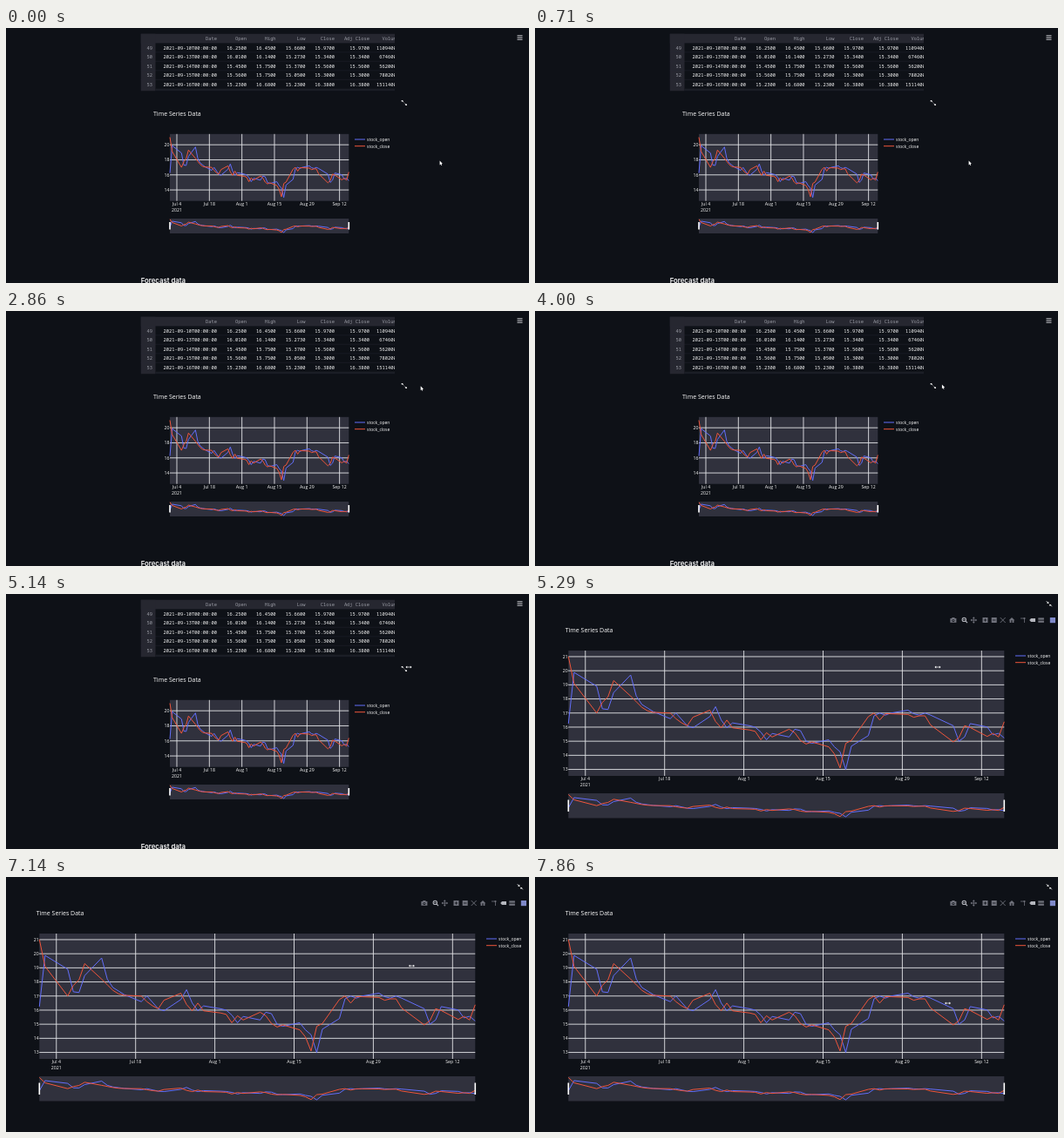
An HTML page with a canvas that plays this animation: 600 by 293 pixels, repeating every 8000 ms.

```html
<!DOCTYPE html>
<html lang="en">
<head>
<meta charset="utf-8">
<title>Time Series Data</title>
<style>
html, body { margin: 0; width: 100%; height: 100%; overflow: hidden; background: #0e1117; }
canvas { display: block; width: 600px; height: 293px; }
</style>
</head>
<body>
<canvas id="stage"></canvas>
<script>
const LOOP = 8000, FPS = 7, FULLSCREEN_AT = 5285;
const PAGE = '#0e1117', PANEL = '#30313d', HEADER = '#262730', WHITE = '#fafafa';
const BLUE = '#636efa', RED = '#ef553b', MUTED = '#70727c';
const SANS = '"Open Sans", sans-serif', MONO = '"Noto Sans Mono", monospace';

const canvas = document.getElementById('stage');
const ctx = canvas.getContext('2d');
const ratio = window.devicePixelRatio || 1;
canvas.width = 600 * ratio;
canvas.height = 293 * ratio;

// Trading days counted from 1 July: no weekends, no 5 July or 6 September.
const days = [];
for (let d = 0; d <= 77; d++) {
  const weekday = (d + 4) % 7;
  if (weekday !== 0 && weekday !== 6 && d !== 4 && d !== 67) days.push(d);
}

const open = [16.25, 19.88, 18.9, 17.3, 17.25, 18.45, 19.7, 18.2, 17.6, 17.35, 17.1,
  16.6, 17, 16.55, 16.1, 15.95, 16.75, 17.45, 16.5, 15.95, 16.3, 16.1, 16, 15.65, 15.1, 15.55,
  15.3, 15.85, 15.75, 15, 14.85, 15.1, 14.6, 14.25, 13, 14.65, 15.4, 16.8, 17, 16.85, 17,
  17.2, 16.95, 16.85, 17, 16.85, 16.1, 15, 15.3, 16.25, 16.01, 15.45, 15.56, 15.23];
const close = [21, 19.1, 17, 17.75, 18.15, 19.3, 18.2, 17.8, 17.4, 17.15, 17.05,
  17, 16.6, 16.3, 16.1, 16.7, 17.2, 16.4, 15.95, 16.5, 15.95, 15.8, 15.7, 15.1, 15.6, 15.3,
  15.85, 15.6, 15.05, 14.8, 14.95, 14.6, 14.1, 13.1, 14.85, 15.05, 16.75, 17, 16.5, 16.95, 16.95,
  16.9, 16.7, 16.8, 16.8, 16.15, 14.95, 15.25, 16.1, 15.97, 15.34, 15.56, 15.3, 16.38];

const TOP_VALUE = 21.43, BOTTOM_VALUE = 12.54;
const dateTicks = ['Jul 4', 'Jul 18', 'Aug 1', 'Aug 15', 'Aug 29', 'Sep 12'];

const tableColumns = [242, 276, 309.6, 343.4, 377, 417, 451];
const tableHead = ['Date', 'Open', 'High', 'Low', 'Close', 'Adj Close', 'Volume'];
const tableRows = [
  ['10', '16.2500', '16.4500', '15.6600', '15.9700', '11094000'],
  ['13', '16.0100', '16.1400', '15.2730', '15.3400', '6746000'],
  ['14', '15.4500', '15.7500', '15.3700', '15.5600', '5620000'],
  ['15', '15.5600', '15.7500', '15.0500', '15.3000', '7802000'],
  ['16', '15.2300', '16.6800', '15.2300', '16.3800', '15114000']
];

const smallView = {
  x: 188, y: 121.8, w: 205.3, h: 76.9, slider: [219, 17], handle: [223, 8.5],
  ticks: [14, 16, 18, 20], title: [169, 98.5], legend: [400, 128], labelY: 202.6
};
const fullView = {
  x: 38.3, y: 65, w: 500, h: 144, slider: [229, 28.5], handle: [236.5, 13.5],
  ticks: [13, 14, 15, 16, 17, 18, 19, 20, 21], title: [34.7, 41.5], legend: [551, 71], labelY: 212.6
};

// Cursor positions: time, x, y
const cursorPath = [
  [0, 497.6, 152.5], [2150, 497.6, 152.5], [2300, 493, 142], [2860, 475.6, 86],
  [3430, 472.5, 85], [4500, 462, 84], [6950, 462, 84], [7600, 473.5, 145], [LOOP, 473.5, 145]
];
const ARROW_UNTIL = 4350;

function rect(x, y, w, h, color) {
  ctx.fillStyle = color;
  ctx.fillRect(x, y, w, h);
}

function line(points, color, width = 1) {
  ctx.beginPath();
  points.forEach(([x, y]) => ctx.lineTo(x, y));
  ctx.strokeStyle = color;
  ctx.lineWidth = width;
  ctx.stroke();
}

function shape(points, color) {
  ctx.beginPath();
  points.forEach(([x, y]) => ctx.lineTo(x, y));
  ctx.fillStyle = color;
  ctx.fill();
}

// Text centred vertically on y by its cap height.
function text(string, x, y, size, { align = 'left', color = WHITE, family = SANS, weight = 400 } = {}) {
  ctx.font = `${weight} ${size}px ${family}`;
  ctx.textAlign = align;
  ctx.fillStyle = color;
  ctx.fillText(string, x, y + size * 0.36);
}

function drawSeries(values, color, x, y, w, h) {
  const scale = h / (TOP_VALUE - BOTTOM_VALUE);
  line(values.map((v, i) => [x + days[i] * w / 77, y + (TOP_VALUE - v) * scale]), color, 1);
}

function drawChart({ x, y, w, h, slider, handle, ticks, title, legend, labelY }) {
  rect(x, y, w, h, PANEL);
  ticks.forEach(value => {
    const tickY = y + (TOP_VALUE - value) * h / (TOP_VALUE - BOTTOM_VALUE);
    line([[x, tickY], [x + w, tickY]], '#e4e5e8', 0.9);
    text(value, x - 0.6, tickY, 5.2, { align: 'right' });
  });
  dateTicks.forEach((label, i) => {
    const tickX = x + (3 + 14 * i) * w / 77;
    line([[tickX, y], [tickX, y + h]], '#e4e5e8', 0.9);
    text(label, tickX, labelY, 5.2, { align: 'center' });
    if (i === 0) text('2021', tickX, labelY + 6.7, 5.2, { align: 'center' });
  });

  const [sliderY, sliderH] = slider;
  rect(x, sliderY, w, sliderH, PANEL);
  [[open, BLUE], [close, RED]].forEach(([values, color]) => {
    drawSeries(values, color, x, y, w, h);
    drawSeries(values, color, x, sliderY, w, sliderH);
  });
  [x, x + w].forEach(edge => rect(edge - 0.8, handle[0], 1.6, handle[1], '#fff'));

  text('Time Series Data', ...title, 7);
  [['stock_open', BLUE], ['stock_close', RED]].forEach(([name, color], i) => {
    const rowY = legend[1] + i * 7.7;
    line([[legend[0], rowY], [legend[0] + 12, rowY]], color, 1);
    text(name, legend[0] + 14, rowY, 5);
  });
}

function drawTable() {
  const mono = { align: 'right', family: MONO };
  const muted = { ...mono, color: '#9b9da6' };
  ctx.save();
  ctx.beginPath();
  ctx.rect(154.5, 6.5, 291.5, 66);
  ctx.clip();
  rect(154.5, 6.5, 291.5, 10.5, HEADER);
  rect(154.5, 6.5, 17, 66, HEADER);
  rect(171.5, 69.7, 274.5, 2.5, '#1b1e26');
  tableHead.forEach((name, i) => text(name, tableColumns[i], 12.3, 5.4, muted));
  tableRows.forEach(([day, o, high, low, c, volume], row) => {
    const y = 22.6 + row * 10.5;
    line([[154.5, y - 5.3], [446, y - 5.3]], '#272a33', 0.4);
    text(49 + row, 168, y, 5.4, muted);
    [`2021-09-${day}T00:00:00`, o, high, low, c, c, volume]
      .forEach((value, i) => text(value, tableColumns[i], y, 5.4, mono));
  });
  ctx.restore();
}

// Two diagonal arrows pointing out of (1) or into (-1) the centre.
function drawResizeIcon(x, y, direction, flip) {
  [-1, 1].forEach(side => {
    const at = (a, b) => [x + side * a * flip, y + side * b];
    const [tip, tail] = direction > 0 ? [3, 0.7] : [0.6, 3];
    const base = tip + (direction > 0 ? -2.1 : 2.1);
    line([at(tip, tip), at(tail, tail)], WHITE, 0.9);
    shape([at(tip, tip), at(base, tip), at(tip, base)], WHITE);
  });
}

function drawModebar() {
  const y = 30, active = '#b4b6bd';
  const plus = (x, r, color, width = 1) => {
    line([[x - r, y], [x + r, y]], color, width);
    line([[x, y - r], [x, y + r]], color, width);
  };
  const dot = (x, cy, r, color) => {
    ctx.beginPath();
    ctx.arc(x, cy, r, 0, 7);
    ctx.fillStyle = color;
    ctx.fill();
  };
  // camera
  rect(476.4, 28, 7, 4.8, MUTED);
  rect(478.3, 27, 3.2, 1.2, MUTED);
  dot(479.9, 30.4, 1.5, PAGE);
  dot(479.9, 30.4, 0.8, MUTED);
  // zoom
  dot(492.3, 29.4, 2.7, active);
  dot(492.3, 29.4, 1.6, PAGE);
  line([[491, 29.4], [493.6, 29.4]], active, 0.7);
  line([[494, 31.2], [496, 33.2]], active, 1.2);
  // pan
  plus(503.3, 3.3, MUTED, 0.9);
  [[0, -1], [1, 0], [0, 1], [-1, 0]].forEach(([dx, dy]) => shape([
    [503.3 + dx * 3.7, y + dy * 3.7],
    [503.3 + dx * 2 + dy * 1.4, y + dy * 2 + dx * 1.4],
    [503.3 + dx * 2 - dy * 1.4, y + dy * 2 - dx * 1.4]
  ], MUTED));
  // zoom in and out
  [516.5, 526.7].forEach(x => rect(x - 3, 27, 6, 6, MUTED));
  plus(516.5, 1.7, PAGE, 0.8);
  line([[525, y], [528.4, y]], PAGE, 0.8);
  // autoscale
  line([[533.7, 27], [539.7, 33]], MUTED, 0.9);
  line([[539.7, 27], [533.7, 33]], MUTED, 0.9);
  // home
  shape([[543.6, 30.3], [547, 27], [550.4, 30.3]], MUTED);
  rect(544.6, 30, 1.8, 3, MUTED);
  rect(547.6, 30, 1.8, 3, MUTED);
  // spike lines
  line([[557, 28], [561.5, 28], [561.5, 33]], MUTED, 0.8);
  rect(560.6, 27.1, 1.8, 1.8, MUTED);
  // hover modes
  shape([[567.2, 30], [569, 28], [574, 28], [574, 32], [569, 32]], active);
  rect(577.3, 27.4, 6.6, 2.2, MUTED);
  rect(577.3, 30.6, 6.6, 2.2, MUTED);
  rect(590.8, 27, 6.2, 6.2, '#7f89c9');
}

function drawCursor(time) {
  const next = Math.max(1, cursorPath.findIndex(([t]) => t > time));
  const [t0, x0, y0] = cursorPath[next - 1], [t1, x1, y1] = cursorPath[next];
  const p = (time - t0) / (t1 - t0);
  const x = x0 + (x1 - x0) * p, y = y0 + (y1 - y0) * p;
  if (time < ARROW_UNTIL) {
    shape([[0, 0], [0, 4.9], [1.1, 3.9], [1.8, 5.5], [2.6, 5.1], [1.9, 3.6], [3.3, 3.5]]
      .map(([dx, dy]) => [x + dx, y + dy]), '#fff');
    return;
  }
  line([[x - 2.5, y], [x + 2.5, y]], '#fff', 0.7);
  [-1, 1].forEach(s => shape([[x + s * 3.5, y], [x + s * 1.8, y - 1.4], [x + s * 1.8, y + 1.4]], '#fff'));
}

function drawPage() {
  drawTable();
  drawChart(smallView);
  drawResizeIcon(456.8, 86, 1, 1);
  [8.8, 11, 13.2].forEach(y => line([[586.5, y], [592.5, y]], '#dedfe2', 0.9));
  text('Forecast data', 154.7, 290.2, 7.8, { family: 'Inter, sans-serif', weight: 600 });
}

function drawFullscreen() {
  drawChart(fullView);
  drawModebar();
  drawResizeIcon(589.8, 11.3, -1, 1);
}

function render(now) {
  const step = Math.floor((now % LOOP + 5) * FPS / 1000) % (LOOP * FPS / 1000);
  const time = step * 1000 / FPS;
  ctx.setTransform(ratio, 0, 0, ratio, 0, 0);
  rect(0, 0, 600, 293, PAGE);
  if (time < FULLSCREEN_AT) drawPage();
  else drawFullscreen();
  drawCursor(time);
  requestAnimationFrame(tick);
}

const start = performance.now();
function tick() {
  render(performance.now() - start);
}
tick();
</script>
</body>
</html>
```
